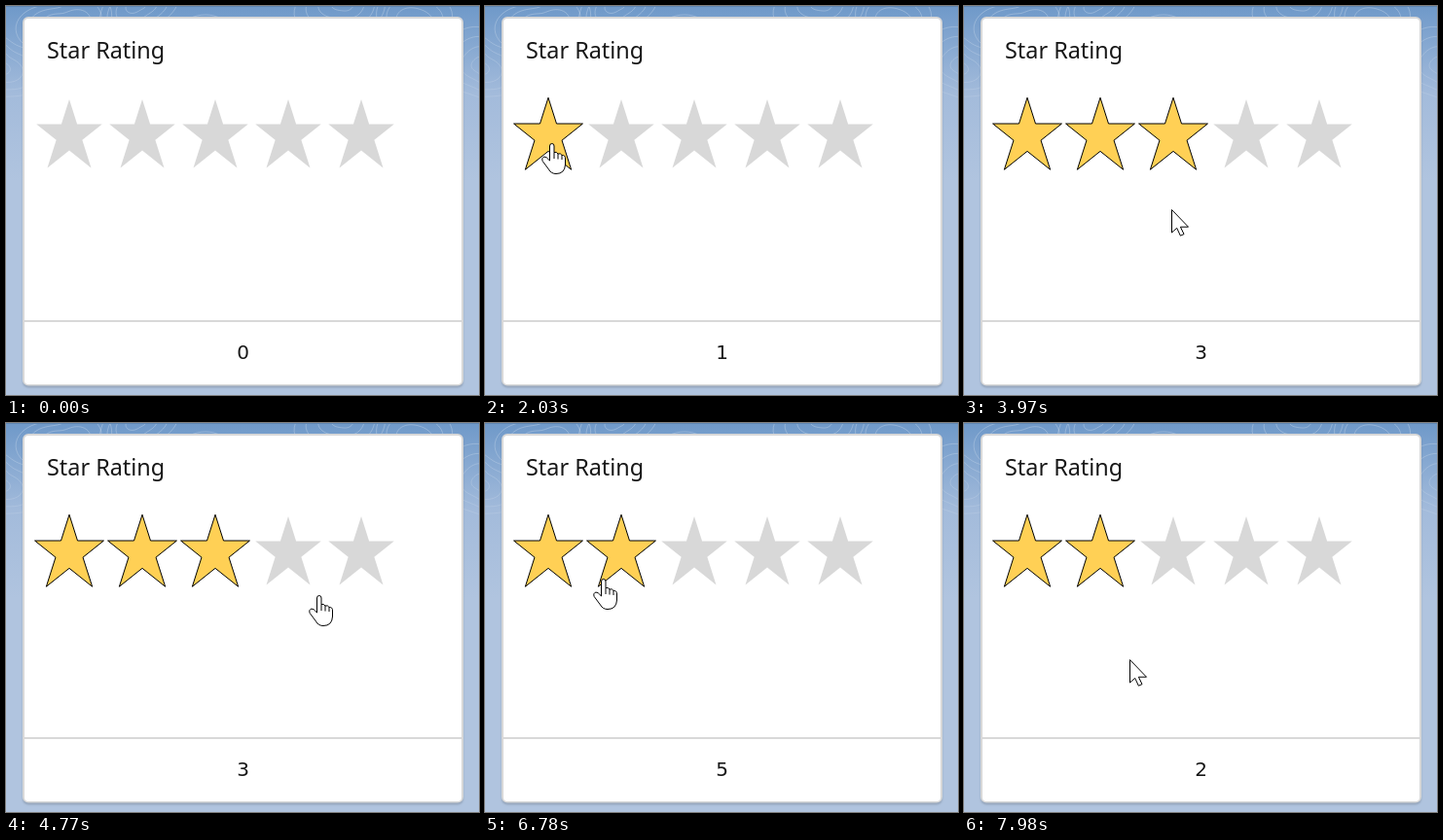
Write an HTML page with a canvas that moves like this. It is 486x400 px and loops after 8000 ms.

```html
<!DOCTYPE html>
<html lang="en">
<head>
<meta charset="utf-8">
<title>Star Rating</title>
<style>
html, body { margin: 0; width: 100%; height: 100%; overflow: hidden; background: #b0c4df; }
canvas { display: block; }
</style>
</head>
<body>
<canvas id="stage" width="486" height="400"></canvas>
<script>
const ctx = document.getElementById('stage').getContext('2d');
const LOOP = 8000, STEP = 78;
const STAR_W = 75, STAR_MID = 131.25, ROW_BOTTOM = 180;

// Each move starts where the last one ended; "rating" marks a click at its start.
const entry = { x: 397, y: 384 };
const moves = [
  { from: 410, to: 1190, x: 102, y: 166 },
  { from: 1260, to: 1500, x: 67, y: 141 },
  { from: 2030, to: 2820, x: 176, y: 229, rating: 1 },
  { from: 2900, to: 3600, x: 209, y: 150 },
  { from: 3750, to: 4300, x: 216, y: 258, rating: 3 },
  { from: 4470, to: 5160, x: 355, y: 150 },
  { from: 5390, to: 5930, x: 238, y: 254, rating: 5 },
  { from: 6390, to: 6790, x: 120, y: 160 },
  { from: 6860, to: 7110, x: 130, y: 138 },
  { from: 7200, to: 7980, x: 170, y: 243, rating: 2 }
];

// Right half of the star, from the top tip to the bottom notch.
const half = [[0, -35.25], [8.1, -9.75], [33.75, -9.75], [13.35, 6.56], [22.5, 35.25], [0, 17.25]];
const outline = [...half, ...half.slice(1, -1).reverse().map(([x, y]) => [-x, y])];

function starPath(i, scale) {
  const path = new Path2D();
  for (const [x, y] of outline) path.lineTo(65 + i * STAR_W + x * scale, STAR_MID + y * scale);
  path.closePath();
  return path;
}
const stars = [0, 1, 2, 3, 4].map(i => ({ plain: starPath(i, 1), lit: starPath(i, 1.05) }));

const arrow = new Path2D('M.5 .5V24L5.7 19.3 9.4 27.2 13 25.6 9.4 18.2H17.5Z');
const hand = new Path2D('M8.5 18V3Q8.5 .5 10.8 .5T13 3V9.5Q15.5 8.5 17 11Q19.6 10 21 12.4' +
  'Q24.5 12 24.5 16V22Q24 31.5 15 31.5Q10 31.5 7.5 27L1.2 18.5Q-.2 15 3 14Q5 13.8 8.5 18Z');
const knuckles = new Path2D('M13 9.5V16M17 11V16.5M21 12.4V17');

const easeOut = (u, power) => 1 - (1 - u) ** power;

function stateAt(t) {
  let rating = 0, pointer = null, last = entry;
  for (const m of moves) {
    if (t < m.from) break;
    rating = m.rating || rating;
    // A click holds the pointer still for its first step.
    const lead = m.rating ? 0 : 1;
    const count = Math.round((m.to - m.from) / STEP) + lead;
    const u = Math.min(1, (Math.floor((t - m.from) / STEP + 0.25) + lead) / count);
    const e = easeOut(u, m.rating ? 1.4 : 2);
    pointer = {
      x: Math.round(last.x + (m.x - last.x) * e),
      y: Math.round(last.y + (m.y - last.y) * e)
    };
    last = m;
  }
  return { rating, pointer };
}

function gradient(height, ...colors) {
  const g = ctx.createLinearGradient(0, 0, 0, height);
  colors.forEach((c, i) => g.addColorStop(i / (colors.length - 1), c));
  return g;
}

function box(x, y, w, h, r, color) {
  ctx.fillStyle = color;
  ctx.beginPath();
  ctx.roundRect(x, y, w, h, r);
  ctx.fill();
}

function contour(cx, cy, r, seed) {
  ctx.beginPath();
  for (let i = 0; i <= 72; i++) {
    const a = i * Math.PI / 36;
    const d = r * (1 + 0.16 * Math.sin(2 * a + seed) + 0.1 * Math.sin(3 * a + seed * 2));
    ctx.lineTo(cx + d * Math.cos(a) * 1.2, cy + d * Math.sin(a));
  }
  ctx.stroke();
}

function drawBackground() {
  ctx.fillStyle = gradient(180, '#6f99c9', '#a3bbdb', '#b0c4df');
  ctx.fillRect(0, 0, 486, 400);
  ctx.strokeStyle = gradient(170, 'rgba(255,255,255,.25)', 'rgba(255,255,255,0)');
  ctx.lineWidth = 1;
  for (let hill = 0; hill < 8; hill++) {
    const x = hill * 71 - 8, y = 28 + 34 * Math.cos(hill * 1.8);
    for (let ring = 1; ring <= 4; ring++) contour(x, y, ring * 9, hill * 1.7 + ring * 0.15);
  }
  ctx.fillStyle = '#5f86b3';
  ctx.fillRect(0, 0, 486, 1);
}

function drawCard(rating) {
  ctx.save();
  ctx.shadowColor = 'rgba(0,0,0,.16)';
  ctx.shadowOffsetY = 2;
  ctx.shadowBlur = 2;
  box(17, 11, 453, 379.5, 6, '#d8d8d8');
  ctx.restore();
  box(19, 13, 449, 376, 4, '#fff');
  box(19, 323, 449, 2, 0, '#d8d8d8');

  ctx.fillStyle = '#181818';
  ctx.textAlign = 'left';
  ctx.font = '300 23.4px "Noto Sans", sans-serif';
  ctx.fillText('Star Rating', 42, 54);
  ctx.textAlign = 'center';
  ctx.font = '20px "DejaVu Sans", sans-serif';
  ctx.fillText(rating, 243.5, 363);
}

function drawStars(litCount) {
  ctx.lineWidth = 1;
  ctx.strokeStyle = '#000';
  stars.forEach((star, i) => {
    const lit = i < litCount;
    ctx.fillStyle = lit ? '#ffd055' : '#d8d8d8';
    ctx.fill(lit ? star.lit : star.plain);
    if (lit) ctx.stroke(star.lit);
  });
}

function drawPointer({ x, y }) {
  const overRow = y < ROW_BOTTOM;
  const shape = overRow ? hand : arrow;
  ctx.save();
  ctx.translate(overRow ? x - 9 : x, y);
  ctx.fillStyle = '#fff';
  ctx.strokeStyle = '#000';
  ctx.lineWidth = 1;
  ctx.fill(shape);
  ctx.stroke(shape);
  if (overRow) ctx.stroke(knuckles);
  ctx.restore();
}

function draw(t) {
  const { rating, pointer } = stateAt(t);
  const hovered = pointer ? stars.findIndex(s => ctx.isPointInPath(s.plain, pointer.x, pointer.y)) : -1;
  drawBackground();
  drawCard(rating);
  drawStars(hovered >= 0 ? hovered + 1 : rating);
  if (pointer) drawPointer(pointer);
}

const start = performance.now();
function tick() {
  draw((performance.now() - start) % LOOP);
  requestAnimationFrame(tick);
}
tick();
</script>
</body>
</html>
```
